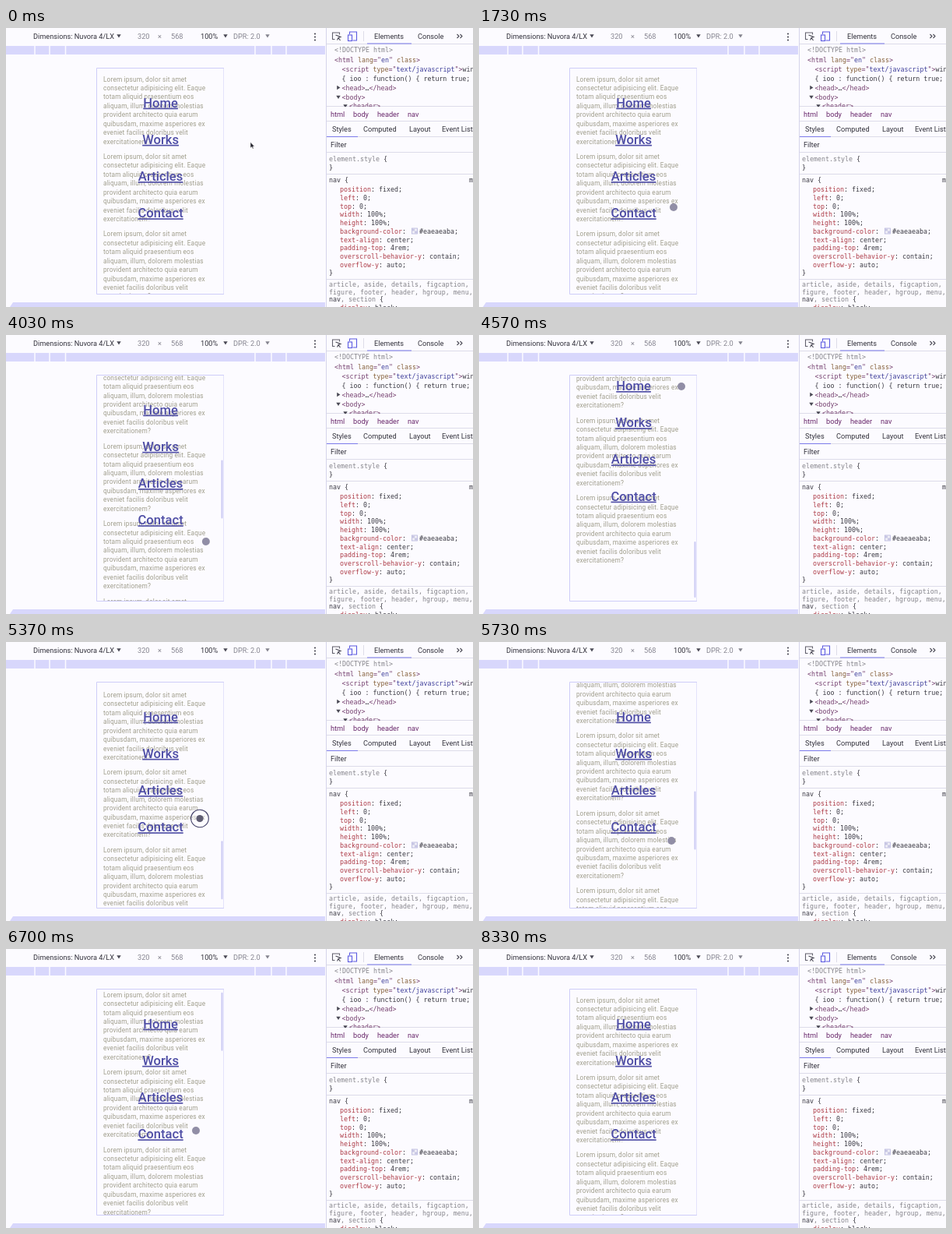
Animation, 600 px wide and 358 px high, one loop 8.36 s. Source, as an HTML page:

```html
<!DOCTYPE html>
<html lang="en">
<head>
<meta charset="utf-8">
<title>Overscroll demo</title>
<style>
  html, body { margin: 0; width: 100%; height: 100%; overflow: hidden; background: #fcfbff; }
  svg { display: block; width: 600px; height: 358px; }
  text { white-space: pre; }
  .ui { font: 9.2px Roboto, Arial, sans-serif; fill: #33323c; }
  .dim { fill: #85848f; }
  .code { font: 8.3px "DejaVu Sans Mono", monospace; fill: #3a3942; }
  .crumb { fill: #6a2a6c; }
  .tag { fill: #75406f; }
  .attr { fill: #85603a; }
  .str { fill: #3f3f9a; }
  .prop { fill: #ad3a45; }
  .soft { fill: #85848a; }
  .lorem { font: 8.3px Roboto, sans-serif; letter-spacing: .15px; fill: #a09e8c; }
  .link { font: 500 16.6px Roboto, sans-serif; fill: #4f4ea6; text-anchor: middle; text-decoration: underline; }
</style>
</head>
<body>
<svg id="stage" viewBox="0 0 600 358" xmlns="http://www.w3.org/2000/svg">
  <defs>
    <clipPath id="screen"><rect x="117.5" y="52" width="162.5" height="289.5"/></clipPath>
    <clipPath id="tree"><rect x="412" y="21" width="188" height="80"/></clipPath>
    <g id="para"></g>
  </defs>
  <rect width="600" height="358" fill="#fcfbff"/>

  <!-- device toolbar and rulers -->
  <g id="toolbar"></g>
  <path d="M0 23H410V34H0zM5 358L9 352H410V358z" fill="#d8d7fc"/>
  <path d="M37 23V34M56 23V34M76.500 23V34M320 23V34M341 23V34M360 23V34" stroke="#fcfbff" stroke-width="1.500"/>
  <g fill="#4a4955"><circle cx="397" cy="7.500" r="1.100"/><circle cx="397" cy="11.500" r="1.100"/><circle cx="397" cy="15.500" r="1.100"/></g>

  <!-- phone -->
  <g clip-path="url(#screen)">
    <g id="page"></g>
    <g id="nav"></g>
    <rect id="thumb" x="276.500" width="2" rx="1" fill="#cbcaf4"/>
  </g>
  <path d="M280 51.500H116.500V341.500H280" fill="none" stroke="#cecdf8"/>
  <path d="M279.500 52V341" stroke="#e4e3fb"/>

  <!-- inspector -->
  <path d="M411.500 0V358" stroke="#d5d4ea"/>
  <path d="M412 20.500H600M412 100.500H600M412 119.500H600M412 139.500H600M412 159.500H600M412 187.500H600M412 322.500H600M459.500 4V17" stroke="#dddce9"/>
  <path d="M464 20H521M412 139.500H452" stroke="#7b7aea" stroke-width="1.200"/>
  <g fill="none" stroke-width="1.100">
    <path d="M422.500 14.500H419.500V6H428.500V8.500" stroke="#62616c"/>
    <path d="M423.500 9L430 11.500L427 12.500L429.500 16M427 12.500L425.500 15.500Z" stroke="#4a4955"/>
    <path d="M441.500 8V5H450.500V16H445.500" stroke="#5c5be0"/>
    <rect x="439.500" y="9" width="5" height="7.500" stroke="#5c5be0"/>
    <path d="M579.500 8L582 10.500L579.500 13M583.500 8L586 10.500L583.500 13" stroke="#4a4955"/>
  </g>
  <g id="tabs"></g>
  <g id="dom" clip-path="url(#tree)"></g>
  <g id="rules"></g>
  <rect x="521.500" y="257" width="7" height="7" fill="#efeef6" stroke="#b5b4dc" stroke-width=".8"/>
  <path d="M522 257.500H525V260.500H528V263.500H525V260.500H522z" fill="#c9c8e4"/>

  <!-- pointer -->
  <g id="pointer">
    <circle id="ring" r="11.300" fill="#fcfbff" fill-opacity=".35" stroke="#403e66" stroke-width="1.100"/>
    <circle id="dot"/>
    <path id="arrow" d="M0 0V7.500L1.800 5.900L3 8.500L4.200 7.900L3.100 5.500H5.300Z" fill="#25242e" stroke="#fff" stroke-width=".5"/>
  </g>
</svg>
<script>
const LOOP = 8360, MAX = 820, PITCH = 99.43, LINE = 11.43;
const $ = id => document.getElementById(id);
const NS = 'http://www.w3.org/2000/svg';

function add(parent, name, attrs) {
  const el = document.createElementNS(NS, name);
  for (const k in attrs) el.setAttribute(k, attrs[k]);
  return $(parent).appendChild(el);
}

// A line is a string or a list of [class, string] runs.
function write(parent, cls, x, y, line) {
  const el = add(parent, 'text', { x, y, class: cls });
  if (typeof line === 'string') { el.textContent = line; return; }
  for (const [c, s] of line) {
    const run = document.createElementNS(NS, 'tspan');
    run.setAttribute('class', c);
    run.textContent = s;
    el.appendChild(run);
  }
}

function caret(parent, x, y, open = true, fill = '#4a4955') {
  const d = open ? `M${x - 2.7} ${y - 1.8}h5.4l-2.7 4.2z` : `M${x - 1.8} ${y - 2.7}v5.4l4.2 -2.7z`;
  add(parent, 'path', { d, fill });
}

const bar = (x, s, dim = '') => write('toolbar', 'ui ' + dim, x, 13.8, s);
bar(35, 'Dimensions: Nuvora 4/LX');
bar(169, '320', 'dim');
bar(195, '×', 'dim');
bar(212, '568', 'dim');
bar(250, '100%');
bar(292, 'DPR: 2.0', 'dim');
caret('toolbar', 145, 10);
caret('toolbar', 282, 10);
caret('toolbar', 336, 10, true, '#85848f');

const label = (x, y, s, cls = '') => write('tabs', 'ui ' + cls, x, y, s);
label(473, 13.8, 'Elements');
label(529, 13.8, 'Console');
label(417, 113.5, 'html', 'crumb');
label(446, 113.5, 'body', 'crumb');
label(477, 113.5, 'header', 'crumb');
label(516, 113.5, 'nav', 'crumb');
label(419, 132.7, 'Styles');
label(459, 132.7, 'Computed');
label(518, 132.7, 'Layout');
label(560, 132.7, 'Event Listeners');
label(417, 152.8, 'Filter');

const node = (x, y, line) => write('dom', 'code', x, y, line);
node(422, 31.3, [['soft', '<!DOCTYPE html>']]);
node(422, 43.5, [['tag', '<html '], ['attr', 'lang'], ['tag', '="'], ['str', 'en'], ['tag', '" '], ['attr', 'class'], ['tag', '>']]);
node(431.5, 55.8, [['tag', '<script '], ['attr', 'type'], ['tag', '="'], ['str', 'text/javascript'], ['tag', '">'], ['', 'window']]);
node(431.5, 68, '{ ioo : function() { return true; } }');
node(431.5, 79.8, [['tag', '<head>'], ['', '…'], ['tag', '</head>']]);
node(431.5, 91.6, [['tag', '<body>']]);
node(441, 103.2, [['tag', '<header>']]);
caret('dom', 427, 76.5, false);
caret('dom', 427, 88.5);
caret('dom', 436, 100);

const rule = (x, y, line) => write('rules', 'code', x, y, line);
rule(415, 170.6, [['soft', 'element.style'], ['', ' {']]);
rule(415, 182.3, '}');
rule(415, 198, 'nav {');
rule(595, 198, 'main.css');
[
  ['position', 'fixed'], ['left', '0'], ['top', '0'], ['width', '100%'], ['height', '100%'],
  ['background-color', ''], ['text-align', 'center'], ['padding-top', '4rem'],
  ['overscroll-behavior-y', 'contain'], ['overflow-y', 'auto']
].forEach(([name, value], i) => {
  rule(429, 210 + i * 10.75, [['prop', name], ['', value ? `: ${value};` : ':']]);
});
rule(531, 263.7, '#eaeaeaba;');
rule(415, 317.3, '}');
rule(415, 332, [['soft', 'article, aside, details, figcaption,']]);
rule(415, 341.5, [['soft', 'figure, footer, header, hgroup, menu,']]);
rule(415, 351.3, [['', 'nav'], ['soft', ', section'], ['', ' {']]);
rule(429, 362, [['prop', 'display'], ['', ': block;']]);

[
  'Lorem ipsum, dolor sit amet', 'consectetur adipisicing elit. Eaque',
  'totam aliquid praesentium eos', 'aliquam, illum, dolorem molestias',
  'provident architecto quia earum', 'quibusdam, maxime asperiores ex',
  'eveniet facilis doloribus velit', 'exercitationem?'
].forEach((s, i) => write('para', 'lorem', 125, 68.5 + i * LINE, s));
for (let i = 0; i < 11; i++) add('page', 'use', { href: '#para', y: i * PITCH });
['Home', 'Works', 'Articles', 'Contact'].forEach((s, i) => write('nav', 'link', 198.6, 101.6 + i * 47.2, s));

const ease = {
  lin: u => u,
  out: u => 1 - (1 - u) ** 2.2,
  soft: u => u * u * (3 - 2 * u)
};

// Steps: [time, value, easing towards this value]
const scroll = [
  [0, 0], [2880, 0], [3230, 205, 'lin'], [3260, 224, 'lin'], [3750, 420, 'out'],
  [4100, 420], [4300, 620, 'lin'], [4500, 820, 'lin'], [4570, 850.6, 'out'], [4950, 820, 'soft'],
  [5200, 820], [5370, 793.4, 'soft'], [5560, 700, 'lin'], [6060, 437, 'out'],
  [6100, 437], [6170, 411.2, 'soft'], [6300, 300, 'lin'], [6700, 8, 'lin'],
  [6760, -24, 'out'], [7130, 0, 'soft'], [LOOP, 0]
];
const handX = [
  [0, 314], [120, 314], [600, 250], [2880, 250], [3230, 250], [3800, 256],
  [4570, 260], [5200, 249], [5370, 249], [6170, 245], [6700, 244], [LOOP, 244]
];
const handY = [
  [0, 146.5], [120, 146.5], [600, 250], [900, 250], [1250, 45], [1600, 230],
  [1780, 230], [2120, 45], [2700, 208], [2880, 208], [3230, -2.5, 'lin'], [3270, -16, 'lin'],
  [3450, -16], [3950, 265], [4100, 265], [4300, 72, 'lin'], [4400, 66], [4620, 66],
  [5100, 199], [5200, 199], [5370, 226], [5560, 319, 'lin'], [5950, 162],
  [6100, 162], [6170, 188, 'soft'], [6300, 299, 'lin'], [6440, 299], [6690, 233],
  [7850, 233], [8200, 380], [LOOP, 380]
];
const presses = [[900, 1270], [1780, 2140], [2850, 3270], [4080, 4310], [5180, 5570], [6080, 6310]];

function at(steps, t) {
  let i = 1;
  while (i < steps.length - 1 && t >= steps[i][0]) i++;
  const [t0, a] = steps[i - 1], [t1, b, kind = 'soft'] = steps[i];
  const u = Math.min(1, Math.max(0, (t - t0) / (t1 - t0)));
  return a + (b - a) * ease[kind](u);
}

const show = (id, on) => $(id).setAttribute('visibility', on ? 'visible' : 'hidden');
const move = (id, x, y) => $(id).setAttribute('transform', `translate(${x} ${y})`);

function draw(t) {
  const s = at(scroll, t);
  const inside = Math.max(0, Math.min(MAX, s));
  const over = s - inside;
  move('page', 0, -s);
  move('nav', 0, -over);

  const length = 75 - Math.abs(over) * 0.1;
  const top = 54 + inside / MAX * 208 + (over > 0 ? 75 - length : 0);
  $('thumb').setAttribute('y', top);
  $('thumb').setAttribute('height', length);
  const fade = Math.min((t - 2900) / 60, (7600 - t) / 250);
  $('thumb').setAttribute('opacity', Math.max(0, Math.min(1, fade)));

  const x = at(handX, t), y = at(handY, t);
  const down = presses.some(([a, b]) => t >= a && t < b);
  const touch = x > 117 && x < 280 && y > 52 && y < 342;
  move('pointer', x, y);
  show('ring', down);
  show('dot', touch);
  show('arrow', !touch);
  $('dot').setAttribute('fill', down ? '#5f5d72' : '#918ea6');
  $('dot').setAttribute('r', down ? 4.6 : 5);
}

const start = performance.now();
function tick() {
  draw((performance.now() - start) % LOOP);
  requestAnimationFrame(tick);
}
draw(0);
requestAnimationFrame(tick);
</script>
</body>
</html>
```
